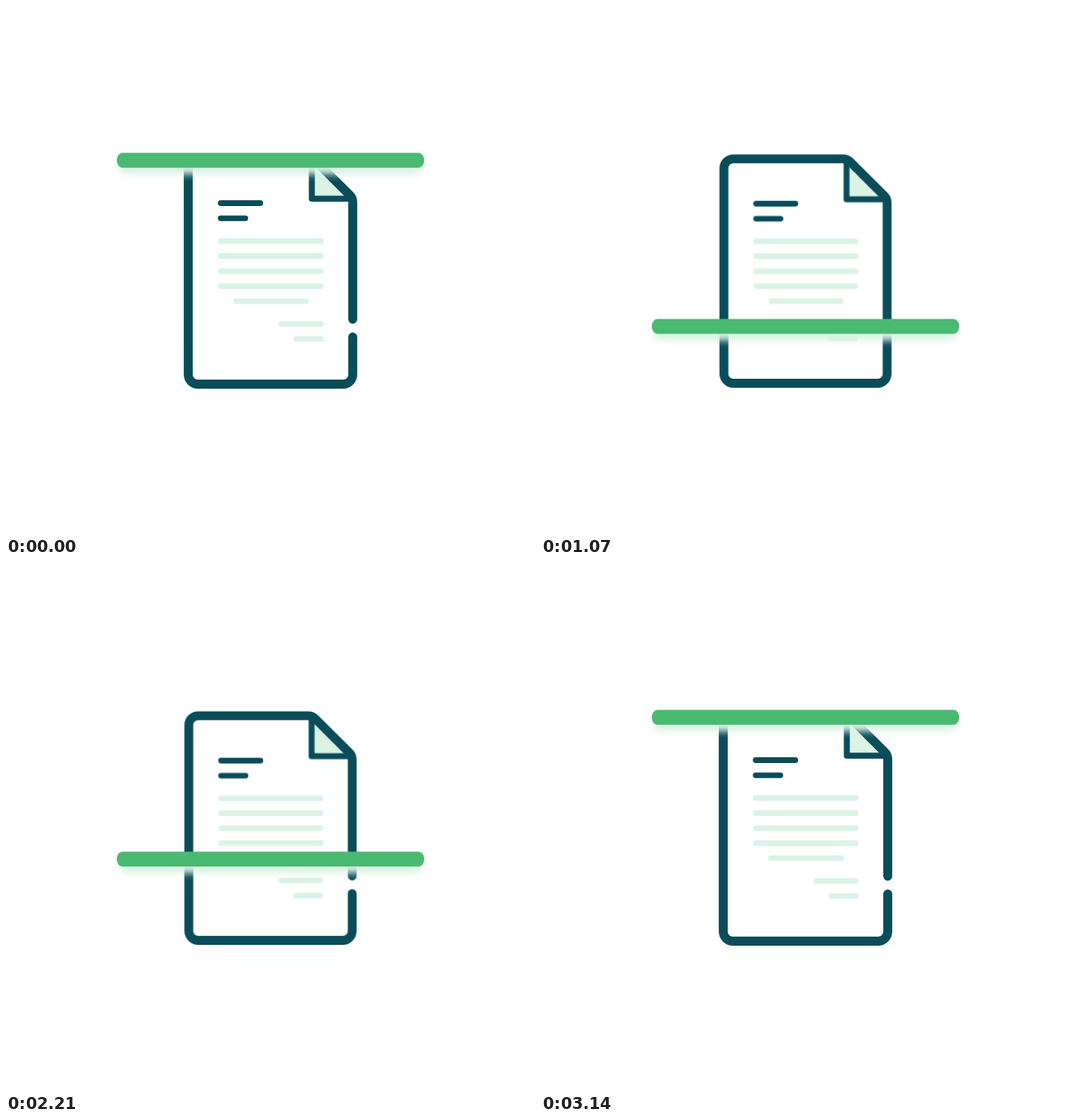
An HTML page without scripts for the animation above (3210 ms loop, 640 by 640 pixels).

```html
<!DOCTYPE html>
<html lang="en">
<head>
<meta charset="utf-8">
<title>Document scan</title>
<style>
  html, body { margin: 0; width: 100%; height: 100%; overflow: hidden; background: #fff; }
  svg { display: block; width: 100%; height: 100%; }

  .page, .scan { animation: 3210ms -30ms infinite; }
  .page { animation-name: shrink; transform-origin: 320px 320px; }
  .scan { animation-name: sweep; }

  .page path { fill: none; stroke: #0a4c5a; stroke-linecap: round; stroke-linejoin: round; }
  .page .edge { stroke-width: 10.8; }
  .page .fold { fill: #daf3e5; stroke-width: 7.2; }
  .page .text { stroke-width: 6.8; }
  .page .pale { stroke: #daf3e5; }

  .bar { fill: #4ab971; }
  .glow { fill: #daf3e5; }

  @keyframes sweep {
    0% { transform: translateY(186.3px); animation-timing-function: cubic-bezier(.335, 0, .64, 1); }
    50.2% { transform: translateY(445.3px); animation-timing-function: cubic-bezier(.364, 0, .636, 1); }
    100% { transform: translateY(186.3px); }
  }
  @keyframes shrink {
    0% { transform: scale(1); animation-timing-function: cubic-bezier(.335, 0, .64, 1); }
    50.2% { transform: scale(.99); animation-timing-function: cubic-bezier(.364, 0, .636, 1); }
    100% { transform: scale(1); }
  }
</style>
</head>
<body>
<svg viewBox="0 0 640 640">
  <defs>
    <filter id="soft" filterUnits="userSpaceOnUse" x="110" y="-30" width="420" height="80" color-interpolation-filters="sRGB">
      <feGaussianBlur stdDeviation="4.5"/>
    </filter>
  </defs>

  <g class="page">
    <path class="fold" d="M370 188V233.2H416"/>
    <path class="edge" d="M419.5 379V237.5Q419.5 232.3 415.8 228.6L374 187Q370.8 183.8 366 183.8H232a11.5 11.5 0 0 0-11.5 11.5V446a11.5 11.5 0 0 0 11.5 11.5H408a11.5 11.5 0 0 0 11.5-11.5V400.4"/>
    <path class="text" d="M259.7 238.5H307.7M259.7 256.8H289.6"/>
    <path class="text pale" d="M259.7 284.4H380.8M259.7 302.5H380.8M259.7 320.8H380.8M259.7 339H380.8M278.2 357.2H363M333 384.6H380.8M351.2 402.9H380.8"/>
  </g>

  <g class="scan">
    <rect class="glow" x="137" y="-1" width="366" height="18" rx="6" ry="9" filter="url(#soft)"/>
    <rect class="bar" x="134" y="-9" width="372" height="18" rx="6.5" ry="9"/>
  </g>
</svg>
</body>
</html>
```
